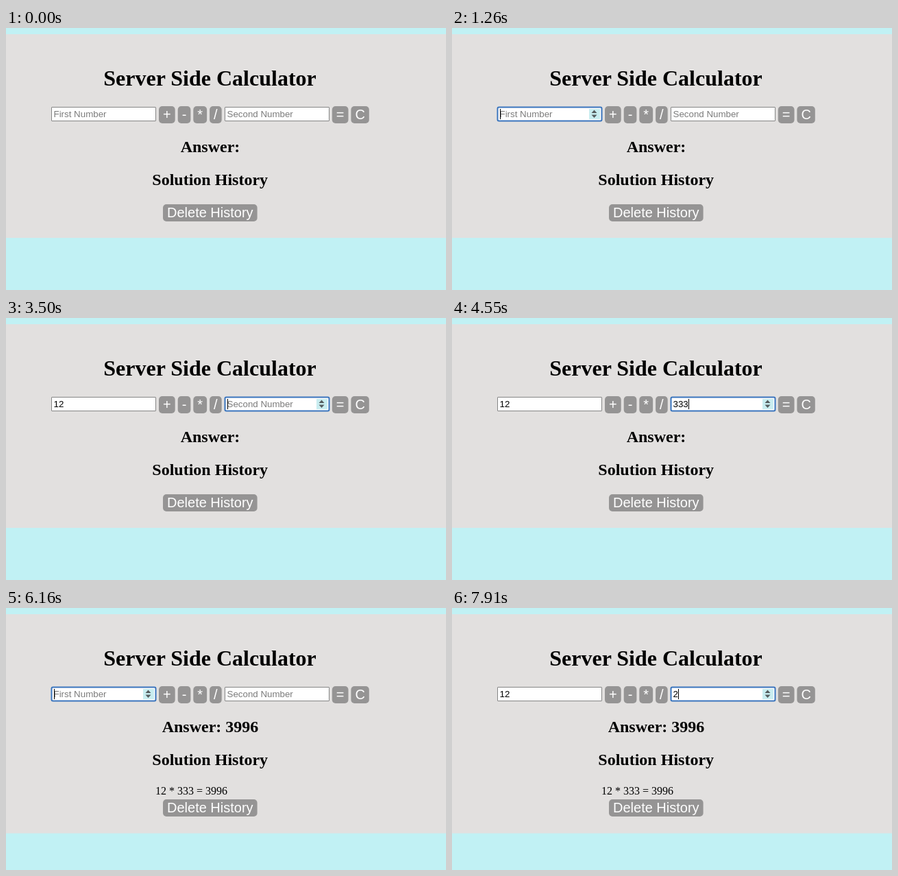
An HTML page that plays this animation: 642x382 px, repeating every 8000 ms.

```html
<!DOCTYPE html>
<html lang="en">
<head>
<meta charset="utf-8">
<title>Server Side Calculator</title>
<style>
  html, body { margin: 0; width: 100%; height: 100%; overflow: hidden; background: #c1f1f4; }
  svg { display: block; }
  text { white-space: pre; }
  .serif { font: 16px "Liberation Serif", serif; }
  h1, .title { font: bold 32px "Liberation Serif", serif; text-anchor: middle; }
  .heading { font: bold 24px "Liberation Serif", serif; text-anchor: middle; }
  .field text { font: 13.333px "Liberation Sans", sans-serif; }
  .button text { font: 20px "Liberation Sans", sans-serif; fill: #fff; }
  .button .face { fill: #959494; }
  .box { fill: #fff; stroke: #858585; }
  .ring { fill: none; stroke: #3a75bd; stroke-width: 2; }
  .halo { fill: none; stroke: #f4f6f8; stroke-width: 1; }
</style>
</head>
<body>
<svg id="stage" width="642" height="382" viewBox="0 0 642 382">
  <rect id="panel" y="9" width="642" height="297" fill="#e2e0df"/>
  <text class="title" x="297.5" y="84">Server Side Calculator</text>
  <text class="heading" id="answer" x="298" y="181"></text>
  <text class="heading" x="297.7" y="229">Solution History</text>
  <text class="serif" id="history" x="218" y="272">12 * 333 = 3996</text>
</svg>
<script>
const LOOP = 8000, BLINK = 500, DIGIT = 7.415;
const stage = document.getElementById('stage');
const panel = document.getElementById('panel');
const answer = document.getElementById('answer');
const history_ = document.getElementById('history');

function add(parent, tag, attrs, text = '') {
  const node = document.createElementNS('http://www.w3.org/2000/svg', tag);
  for (const key in attrs) node.setAttribute(key, attrs[key]);
  node.textContent = text;
  return parent.appendChild(node);
}

const show = (node, on) => node.setAttribute('visibility', on ? 'visible' : 'hidden');

function makeButton(label, x, y, width) {
  const group = add(stage, 'g', { class: 'button' });
  add(group, 'rect', { class: 'face', x, y, width, height: 25, rx: 5 });
  add(group, 'text', { x: x + 6, y: y + 19 }, label);
  const ring = add(group, 'g', {});
  add(ring, 'rect', { class: 'halo', x: x - 1.5, y: y - 1.5, width: width + 3, height: 28, rx: 4 });
  add(ring, 'rect', { class: 'ring', x, y, width, height: 25, rx: 3 });
  show(ring, false);
  return { group, ring };
}

function makeField(x, placeholder) {
  const group = add(stage, 'g', { class: 'field' });
  const textX = x + 3.5;
  add(group, 'rect', { class: 'box', x: x + .5, y: 115.5, width: 152, height: 20, rx: .5 });
  const spinner = add(group, 'g', {});
  add(spinner, 'rect', { x: x + 134, y: 118, width: 16, height: 15, fill: '#c9edf0' });
  add(spinner, 'path', {
    d: `M${x + 137.5} 124l4-4.5 4 4.5zm0 2.5h8l-4 4.5z`, fill: '#555c5e'
  });
  const ring = add(group, 'rect', { class: 'ring', x: x + .5, y: 115.5, width: 152, height: 20, rx: 2 });
  const text = add(group, 'text', { x: textX, y: 130 });
  const caret = add(group, 'rect', { y: 118, width: 1, height: 15, fill: '#000' });
  return {
    draw(value, focused, hovered, caretOn) {
      text.textContent = value || placeholder;
      text.setAttribute('fill', value ? '#000' : '#7b7b7b');
      caret.setAttribute('x', Math.ceil(textX + value.length * DIGIT));
      show(caret, focused && caretOn);
      show(ring, focused);
      show(spinner, focused || hovered);
    }
  };
}

const first = makeField(66, 'First Number');
const second = makeField(319, 'Second Number');
makeButton('+', 223, 114, 23.7);
makeButton('-', 250.7, 114, 18.7);
const times = makeButton('*', 273.3, 114, 19.8);
makeButton('/', 297.1, 114, 17.6);
const equals = makeButton('=', 475.8, 114, 23.7);
makeButton('C', 503.4, 114, 26.4);
const erase = makeButton('Delete History', 229, 257, 137.6);

// Each step changes part of the state; focusing or typing restarts the caret blink.
const steps = [
  [0, { a: '', b: '', focus: '', hover: '', solved: false }],
  [1120, { hover: 'a' }],
  [1190, { focus: 'a' }],
  [1330, { a: '1' }],
  [1400, { a: '12' }],
  [2800, { focus: '*', hover: '' }],
  [3150, { hover: 'b' }],
  [3220, { focus: 'b' }],
  [3780, { b: '3' }],
  [3920, { b: '33' }],
  [4060, { b: '333' }],
  [4900, { focus: '=', hover: '' }],
  [4970, { a: '', b: '', solved: true }],
  [6020, { hover: 'a' }],
  [6090, { focus: 'a' }],
  [6230, { a: '1' }],
  [6300, { a: '12' }],
  [7070, { focus: '*', hover: '' }],
  [7420, { hover: 'b' }],
  [7560, { focus: 'b' }],
  [7770, { b: '2' }]
];

function draw(time) {
  const state = {};
  let blinkStart = 0;
  for (const [at, change] of steps) {
    if (at > time) break;
    Object.assign(state, change);
    if (!('hover' in change) || 'focus' in change) blinkStart = at;
  }
  const { a, b, focus, hover, solved } = state;
  const caretOn = Math.floor((time - blinkStart) / BLINK) % 2 === 0;
  first.draw(a, focus === 'a', hover === 'a', caretOn);
  second.draw(b, focus === 'b', hover === 'b', caretOn);
  show(times.ring, focus === '*');
  show(equals.ring, focus === '=');
  show(history_, solved);
  answer.textContent = solved ? 'Answer: 3996' : 'Answer:';
  panel.setAttribute('height', solved ? 319.5 : 297);
  erase.group.setAttribute('transform', `translate(0 ${solved ? 22 : 0})`);
}

const start = performance.now();
function tick() {
  draw((performance.now() - start) % LOOP);
  requestAnimationFrame(tick);
}
tick();
</script>
</body>
</html>
```
